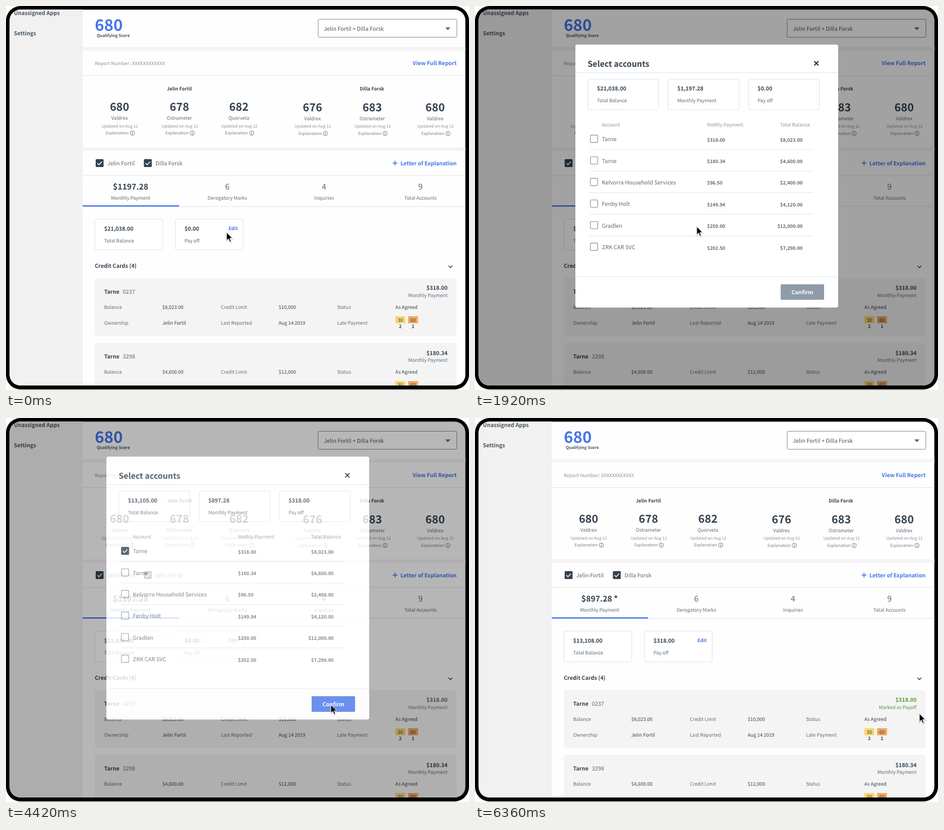
Animation, 821 px wide and 682 px high, one loop 6980 ms. Source, as an HTML page:

```html
<!DOCTYPE html>
<html lang="en">
<head>
<meta charset="utf-8">
<title>Select accounts</title>
<style>
html, body { margin: 0; width: 100%; height: 100%; overflow: hidden; background: #fff; }
svg { display: block; width: 821px; height: 682px; }
text {
  font-family: "Noto Sans CJK SC", "Noto Sans CJK JP", "Noto Sans CJK", sans-serif;
  text-rendering: geometricPrecision;
  white-space: pre;
}
#modal, .before, .after, .idle, .picked, #cursor { animation: 6.98s linear infinite; }
#modal { animation-name: modal; }
.before { animation-name: leave; }
.after { animation-name: enter; }
.idle { animation-name: unpick; }
.picked { animation-name: pick; }
#cursor { animation-name: cursor; }

@keyframes modal {
  0%, 16.905% { opacity: 0; }
  21.203% { opacity: 1; }
  62.03% { opacity: 1; animation-timing-function: ease-in-out; }
  66.19%, 100% { opacity: 0; }
}
@keyframes leave {
  0% { opacity: 1; }
  62.03% { opacity: 1; animation-timing-function: ease-in-out; }
  66.19%, 100% { opacity: 0; }
}
@keyframes enter {
  0% { opacity: 0; }
  62.03% { opacity: 0; animation-timing-function: ease-in-out; }
  66.19%, 100% { opacity: 1; }
}
@keyframes unpick {
  0%, 37.536% { opacity: 1; }
  41.834%, 100% { opacity: 0; }
}
@keyframes pick {
  0%, 37.536% { opacity: 0; }
  41.834%, 100% { opacity: 1; }
}
@keyframes cursor {
  0% { transform: translate(391px, 402px); }
  4.011%, 6.017% { transform: translate(396.5px, 398px); }
  10.029%, 27.221% { transform: translate(399.5px, 397px); }
  36.103%, 37.536% { transform: translate(209.5px, 238px); }
  41.834% { transform: translate(215px, 236.5px); }
  45.845% { transform: translate(215px, 236.5px); animation-timing-function: ease-out; }
  51.576%, 61.89% { transform: translate(576px, 509px); }
  66.19%, 73.352% { transform: translate(576px, 510px); }
  /* drift right, then circle the paid-off amount */
  78.4% { transform: translate(661px, 510px); }
  83.381% { transform: translate(744px, 525px); }
  84.6% { transform: translate(724px, 518px); }
  85.8% { transform: translate(715px, 501px); }
  87% { transform: translate(726px, 482px); }
  88.2% { transform: translate(750px, 475px); }
  89.3% { transform: translate(775px, 483px); }
  90.2% { transform: translate(788px, 503px); }
  91.117%, 100% { transform: translate(788px, 525px); }
}
</style>
</head>
<body>
<svg id="stage" viewBox="0 0 821 682"></svg>
<script>
const DARK = '#33424f', MID = '#5d6a76', SOFT = '#8b949c', BLUE = '#4674e9', GREEN = '#549a35';
const LINE = '#e3e6ea';
const SMALL = 8.53, BASE = 9.85;
const SMALL_BOLD = 8.35, BASE_BOLD = 9.7;
const ANN = 'Jelin Fortil', BEA = 'Dilla Forsk';

const text = (x, y, str, size, fill, weight = 400, anchor = 'start') =>
  `<text x="${x}" y="${y}" font-size="${size}" fill="${fill}" font-weight="${weight}" text-anchor="${anchor}">${str}</text>`;
const small = (x, y, str, fill = MID, anchor) => text(x, y, str, SMALL, fill, 400, anchor);
const base = (x, y, str, fill = MID, anchor) => text(x, y, str, BASE, fill, 400, anchor);
const smallBold = (x, y, str, fill = DARK, anchor) => text(x, y, str, SMALL_BOLD, fill, 700, anchor);
const bold = (x, y, str, fill = DARK, anchor) => text(x, y, str, BASE_BOLD, fill, 700, anchor);
const rect = (x, y, w, h, fill, extra = '') =>
  `<rect x="${x}" y="${y}" width="${w}" height="${h}" fill="${fill}" ${extra}/>`;
const frame = (x, y, w, h, stroke = '#dfe3e8') => rect(x, y, w, h, '#fff', `rx="2" stroke="${stroke}"`);
const rule = (x1, x2, y) => rect(x1, y - .5, x2 - x1, 1, LINE);
const stroke = (d, color, width) =>
  `<path d="${d}" fill="none" stroke="${color}" stroke-width="${width}"/>`;
const group = (attrs, ...parts) => `<g ${attrs}>${parts.join('')}</g>`;
const swap = (from, to, before, after) =>
  group(`class="${from}"`, before) + group(`class="${to}"`, after);

const checked = (x, y) => rect(x, y, 14, 14, DARK, 'rx="1.5"') +
  stroke(`M${x + 3} ${y + 7.2}l2.8 2.8 5.3-5.6`, '#fff', 1.5);

function score(cx, dy, value, bureau) {
  return group(`transform="translate(${cx} ${dy})"`,
    text(0, 186.3, value, 19.4, DARK, 700, 'middle'),
    small(0, 202, bureau, MID, 'middle'),
    text(.5, 215.5, 'Updated on Aug 12', 7.33, SOFT, 400, 'middle'),
    text(-24.7, 228.3, 'Explanation', 7.4, '#77828c'),
    `<circle cx="22.7" cy="225.8" r="3.9" fill="none" stroke="${MID}" stroke-width=".8"/>`,
    stroke('M22.7 223.3v1M22.7 225v3.2', MID, 1));
}

function tab(cx, value, label) {
  return text(cx, 326, value, 14.2, MID, 500, 'middle') + small(cx, 343.5, label, MID, 'middle');
}

function badge(x, fill, days, count) {
  return rect(x, 551, 17.5, 12.5, fill) +
    small(x + 8.7, 560.6, days, DARK, 'middle') +
    smallBold(x + 8.7, 572, count, DARK, 'middle');
}

function card(dy, number, balance, limit, payment) {
  return group(`transform="translate(0 ${dy})"`,
    rect(157.5, 483, 641.5, 103.5, '#f4f4f4', 'rx="4"'),
    bold(174, 511.3, 'Tarne'), base(207, 511.3, number),
    payment,
    small(174, 538.2, 'Balance'), small(277, 538.2, balance, DARK),
    small(381, 538.2, 'Credit Limit'), small(483.5, 538.2, limit, DARK),
    small(587, 538.2, 'Status'), small(690.5, 538.2, 'As Agreed', DARK),
    small(174, 565.6, 'Ownership'), small(277, 565.6, ANN, DARK),
    small(381, 565.6, 'Last Reported'), small(483.5, 565.6, 'Aug 14 2019', DARK),
    small(587, 565.6, 'Late Payment'),
    badge(690.5, '#f8d66d', '30', '2'), badge(713, '#f4a65e', '60', '1'));
}

const payment = (amount, label, top = DARK, bottom = MID) =>
  bold(783, 504.4, amount, top, 'end') + small(783, 516.8, label, bottom, 'end');

const totals = (monthly, balance, payoff) =>
  text(221, 326, monthly, 14.1, DARK, 700, 'middle') +
  bold(174, 398.8, balance) + bold(316.5, 398.8, payoff);

const page = [
  rect(0, 0, 821, 682, '#fefefe'),
  rect(0, 0, 136, 682, '#f1f1f1'),
  bold(14, 16, 'Unassigned Apps', '#465460'),
  bold(14, 51.5, 'Settings', '#465460'),
  text(157.5, 44.2, '680', 28, BLUE, 700),
  text(161, 55.3, 'Qualifying Score', 7.25, '#465460', 700),
  frame(553.5, 23.5, 246, 32, '#8b949c'),
  base(563.5, 43.6, `${ANN} + ${BEA}`, '#465460'),
  `<path d="M779 38h9l-4.5 5z" fill="${MID}"/>`,
  rect(136, 73, 685, 6, '#f5f3f5'),
  small(157.5, 104.5, 'Report Number: XXXXXXXXXXXX', SOFT),
  bold(799, 105.2, 'View Full Report', BLUE, 'end'),
  rule(136, 821, 123.5),
  smallBold(307.5, 149.8, ANN, DARK, 'middle'),
  smallBold(649, 150.3, BEA, DARK, 'middle'),
  score(201.3, 0, '680', 'Valdrex'),
  score(307.5, 0, '678', 'Ostrameter'),
  score(413, 0, '682', 'Quorveta'),
  score(543.5, .6, '676', 'Valdrex'),
  score(649.5, .6, '683', 'Ostrameter'),
  score(761, .6, '680', 'Valdrex'),
  rect(136, 251, 685, 6, '#f6f2f5'),
  checked(159, 272), base(179.5, 283, ANN),
  checked(244.5, 272), base(265, 283, BEA),
  stroke('M685.5 279h8.5M689.75 274.75v8.5', BLUE, 1.5),
  bold(799, 282.5, 'Letter of Explanation', BLUE, 'end'),
  rule(136, 821, 301),
  small(221, 343.5, 'Monthly Payment', MID, 'middle'),
  tab(392.5, '6', 'Derogatory Marks'),
  tab(564, '4', 'Inquiries'),
  tab(735, '9', 'Total Accounts'),
  rule(136, 821, 356),
  rect(136, 354, 171, 2.2, BLUE),
  frame(157.5, 378.5, 120.5, 54.5), small(174, 420, 'Total Balance'),
  frame(300.5, 378.5, 120, 54.5), small(316.5, 420, 'Pay off'),
  smallBold(411, 398.2, 'Edit', BLUE, 'end'),
  swap('before', 'after',
    totals('$1197.28', '$21,038.00', '$0.00'),
    totals('$897.28 *', '$13,108.00', '$318.00')),
  bold(157.5, 464.8, 'Credit Cards (4)'),
  stroke('M784.7 461.3l3.4 3.4 3.4-3.4', DARK, 1.4),
  card(0, '0237', '$8,023.00', '$10,000', swap('before', 'after',
    payment('$318.00', 'Monthly Payment'),
    payment('$318.00', 'Marked as Payoff', GREEN, GREEN))),
  card(115.2, '3298', '$4,600.00', '$12,000', payment('$180.34', 'Monthly Payment'))
];

const accounts = [
  ['Tarne', '$318.00', '$8,023.00'],
  ['Tarne', '$180.34', '$4,600.00'],
  ['Kelvorra Household Services', '$96.50', '$2,400.00'],
  ['Fenby Holt', '$149.94', '$4,120.00'],
  ['Gradlen', '$250.00', '$12,000.00'],
  ['ZRK CAR SVC', '$202.50', '$7,290.00']
];

const accountRow = ([name, monthly, balance], i) => group(`transform="translate(0 ${i * 38.35})"`,
  rect(204.6, 229.4, 13, 13, '#fff', `rx="1.5" stroke="${SOFT}" stroke-width="1.1"`),
  base(225, 240.2, name),
  smallBold(411.5, 240.8, monthly, MID),
  smallBold(581, 240.8, balance, MID, 'end'),
  i < 5 ? rule(203, 600, 254.8) : '');

const summary = (...values) => values.map((v, i) => bold(216.3 + i * 142.4, 150.2, v)).join('');
const button = fill => rect(542, 494.3, 77, 27.4, fill, 'rx="2"');

const modal = [
  rect(0, 0, 821, 682, '#000', 'opacity=".36"'),
  rect(178, 68.5, 466, 467, '#fff', 'rx="3.5"'),
  text(199.7, 107.8, 'Select accounts', 14.3, DARK, 700),
  stroke('M601.5 98l7.6 7.6M609.1 98l-7.6 7.6', '#1f2b36', 1.8),
  rule(178, 644, 118.5),
  ...['Total Balance', 'Monthly Payment', 'Pay off'].map((label, i) =>
    frame(200 + i * 142.5, 130, 125.5, 54) + small(216.3 + i * 142.4, 171.3, label)),
  swap('idle', 'picked',
    summary('$21,038.00', '$1,197.28', '$0.00'),
    summary('$13,105.00', '$897.28', '$318.00')),
  small(225, 214, 'Account', SOFT),
  small(411.5, 214, 'Mothly Payment', SOFT),
  small(594, 214, 'Total Balance', SOFT, 'end'),
  ...accounts.map(accountRow),
  group('class="picked"', checked(204.2, 229)),
  rule(178, 644, 480.8),
  button('#8f9ba8'),
  group('class="picked"', button('#4876ec')),
  bold(580.5, 511.8, 'Confirm', '#fff', 'middle')
];

const arrow = 'M0 0V14.6L3.4 11.5 5.8 17.2 8.2 16.2 5.8 10.6H10.4Z';

document.getElementById('stage').innerHTML = [
  '<defs><clipPath id="screen"><rect x="6.5" y="6.5" width="808" height="667.5" rx="19"/></clipPath></defs>',
  rect(0, 0, 821, 681, '#000', 'rx="26"'),
  group('clip-path="url(#screen)"', ...page, group('id="modal"', ...modal)),
  group('id="cursor"',
    `<path d="${arrow}" transform="translate(.4 1)" fill="#000" stroke="#000" stroke-width="2" opacity=".15"/>`,
    `<path d="${arrow}" fill="#000" stroke="#fff" stroke-width="1"/>`)
].join('');
</script>
</body>
</html>
```
